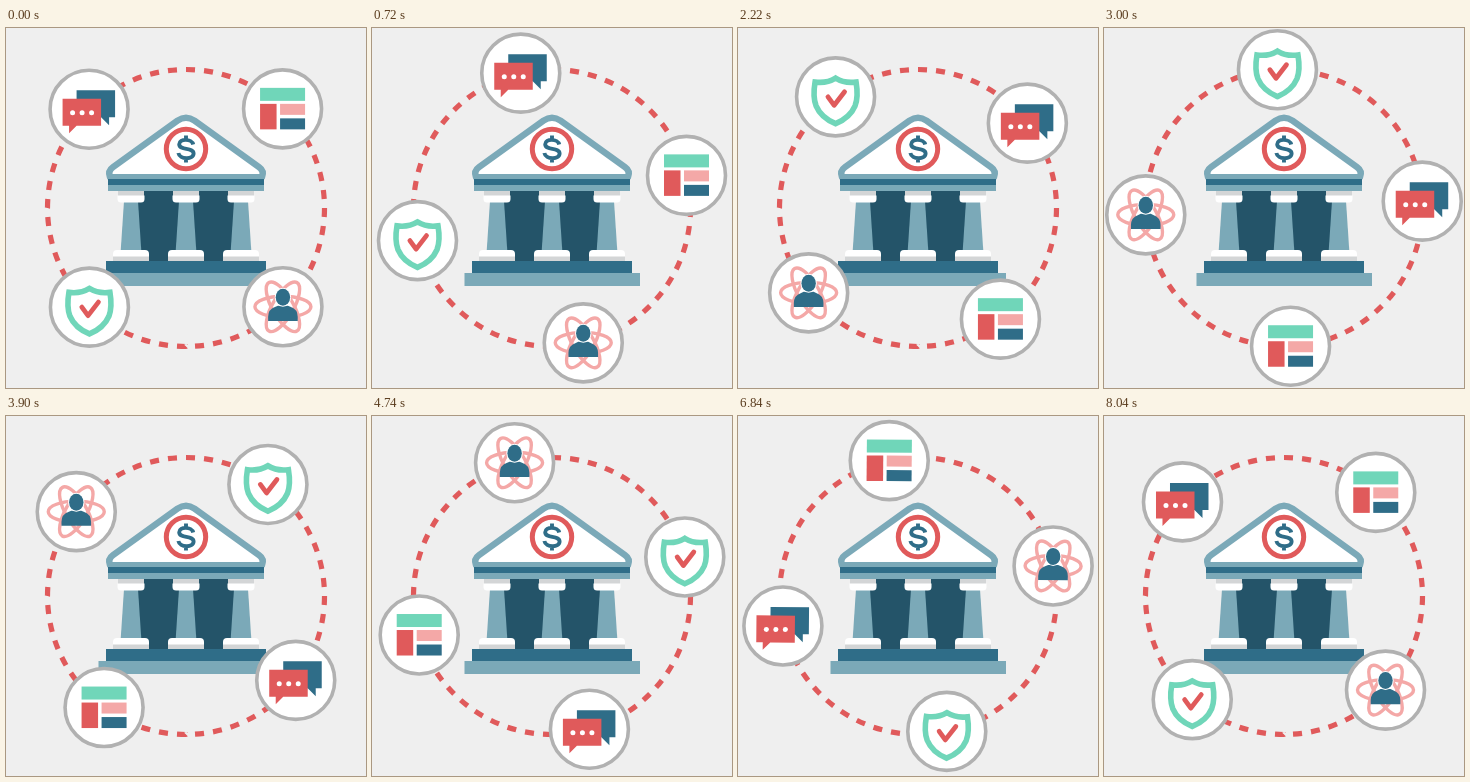
These frames come from a looping animation (360x360 px, 8100 ms). An HTML page:

```html
<!DOCTYPE html>
<html lang="en">
<head>
<meta charset="utf-8">
<title>Bank services</title>
<style>
  html, body { margin: 0; width: 100%; height: 100%; overflow: hidden; background: #efefef; }
  svg { display: block; width: 100vw; height: 100vh; }
  .red { fill: #e05a5b; }
  .blue { fill: #2f6d88; }
  .steel { fill: #7ba9b8; }
  .night { fill: #245469; }
  .mint { fill: #70d6b9; }
  .pink { fill: #f4a8a7; }
  .white { fill: #fff; }
  .shade { fill: #d3d5d6; }
  .line { fill: none; }
  .disc { fill: #fff; stroke: #b1b1b1; stroke-width: 3.6; }
</style>
</head>
<body>
<svg viewBox="0 0 360 360">
  <defs>
    <g id="column">
      <path class="steel" d="M-7 173H7L10.3 223H-10.3Z"/>
      <rect class="shade" x="-13" y="163" width="26" height="6"/>
      <path class="white" d="M-13.5 167.5H13.5V171Q13.5 174.5 10 174.5H-10Q-13.5 174.5 -13.5 171Z"/>
      <rect class="shade" x="-18" y="227" width="36" height="6"/>
      <path class="white" d="M-18 228.5V226Q-18 222 -14 222H14Q18 222 18 226V228.5Z"/>
    </g>
  </defs>

  <circle class="line" cx="180" cy="180" r="138.5" stroke="#e05a5b" stroke-width="5.2"
    pathLength="48" stroke-dasharray=".5 .5"/>

  <g id="bank">
    <rect class="night" x="125" y="163" width="110" height="70"/>
    <use href="#column" x="125"/>
    <use href="#column" x="180"/>
    <use href="#column" x="235"/>
    <path d="M104 149.3Q101.5 143 107 139.2L171.5 92.6Q180 86.8 188.5 92.6L253 139.2Q258.5 143 256 149.3Z"
      fill="#fff" stroke="#7ba9b8" stroke-width="6.4" stroke-linejoin="round"/>
    <rect class="blue" x="102" y="151" width="156" height="6.5"/>
    <rect class="steel" x="102" y="157" width="156" height="6"/>
    <rect class="blue" x="100" y="233" width="160" height="12"/>
    <rect class="steel" x="92.5" y="245" width="175.5" height="13"/>
    <circle cx="180" cy="121" r="19.7" fill="#fff" stroke="#e05a5b" stroke-width="5"/>
    <path class="line" stroke="#2f6d88" stroke-width="3.9"
      d="M187.2 116.5C186 110.5 173.2 110.3 173.2 116.2C173.2 123 187.6 118.7 187.6 125.6C187.6 132 173.5 131.6 172.4 125M180 107.5V112.5M180 129.5V134.5"/>
  </g>

  <g class="badge">
    <circle class="disc" r="39"/>
    <g class="icon">
      <path class="blue" d="M-12.5 -19H26V8H20V16L12 8H-12.5Z"/>
      <path class="red" d="M-26.5 -10.5H12V16.5H-12.5L-20 24V16.5H-26.5Z"/>
      <g class="white">
        <circle cx="-16.5" cy="3.5" r="2.5"/>
        <circle cx="-7" cy="3.5" r="2.5"/>
        <circle cx="2.5" cy="3.5" r="2.5"/>
      </g>
    </g>
  </g>

  <g class="badge">
    <circle class="disc" r="39"/>
    <g class="icon">
      <rect class="mint" x="-22.5" y="-21" width="45" height="13"/>
      <rect class="red" x="-22.5" y="-5" width="16.5" height="25.5"/>
      <rect class="pink" x="-2.5" y="-5" width="25" height="11"/>
      <rect class="blue" x="-2.5" y="9.5" width="25" height="11"/>
    </g>
  </g>

  <g class="badge">
    <circle class="disc" r="39"/>
    <g class="icon">
      <g class="line" stroke="#f4a8a7" stroke-width="3.4">
        <ellipse rx="28" ry="10.5"/>
        <ellipse rx="28" ry="10.5" transform="rotate(60)"/>
        <ellipse rx="28" ry="10.5" transform="rotate(120)"/>
      </g>
      <path class="blue" d="M-14.8 14.2V10Q-14.6 2.5 -8 .3L-5 -1H5L8 .3Q14.6 2.5 14.8 10V14.2Z"/>
      <ellipse class="blue" cy="-9.5" rx="7.2" ry="8.5"
        stroke="#fff" stroke-width="2" paint-order="stroke"/>
    </g>
  </g>

  <g class="badge">
    <circle class="disc" r="39"/>
    <g class="icon line">
      <path stroke="#70d6b9" stroke-width="5.6"
        d="M0 -18.7Q-9 -13.2 -20.5 -14.8Q-23 0 -19.5 9Q-14.5 20.8 0 26.8Q14.5 20.8 19.5 9Q23 0 20.5 -14.8Q9 -13.2 0 -18.7Z"/>
      <path stroke="#e05a5b" stroke-width="4.8" stroke-linecap="round" stroke-linejoin="round"
        d="M-7.6 0L-1.4 8.5L9 -5"/>
    </g>
  </g>
</svg>
<script>
  const LOOP = 8100, STEP = 60, RADIUS = 138.4, START = 224.9;
  const TURN = [[0, 0], [5940, 262], [8100, 360]];
  const TILT = [[0, 0], [4740, 0], [5940, 1.2], [6840, 0.5], [8040, 0], [8100, 0]];
  const badges = [...document.querySelectorAll('.badge')];
  const rad = deg => deg * Math.PI / 180;

  function sample(keys, t) {
    const i = keys.findIndex(k => k[0] > t);
    const [t0, a] = keys[i - 1], [t1, b] = keys[i];
    return a + (b - a) * (t - t0) / (t1 - t0);
  }

  function draw(now) {
    const t = Math.floor((now % LOOP) / STEP) * STEP;
    const turn = START + sample(TURN, t);
    const tilt = sample(TILT, t);
    badges.forEach((badge, i) => {
      const base = turn + i * 90;
      // the orbit leans slightly toward the vertical on the diagonals
      const a = rad(base + 0.65 * Math.sin(rad(2 * base)));
      const x = 180 + RADIUS * Math.cos(a), y = 180 + RADIUS * Math.sin(a);
      badge.setAttribute('transform', `translate(${x.toFixed(2)} ${y.toFixed(2)})`);
      badge.querySelector('.icon').setAttribute('transform', `rotate(${tilt.toFixed(2)})`);
    });
  }

  const begin = performance.now();
  function tick() {
    draw(performance.now() - begin);
    requestAnimationFrame(tick);
  }
  tick();
</script>
</body>
</html>
```
